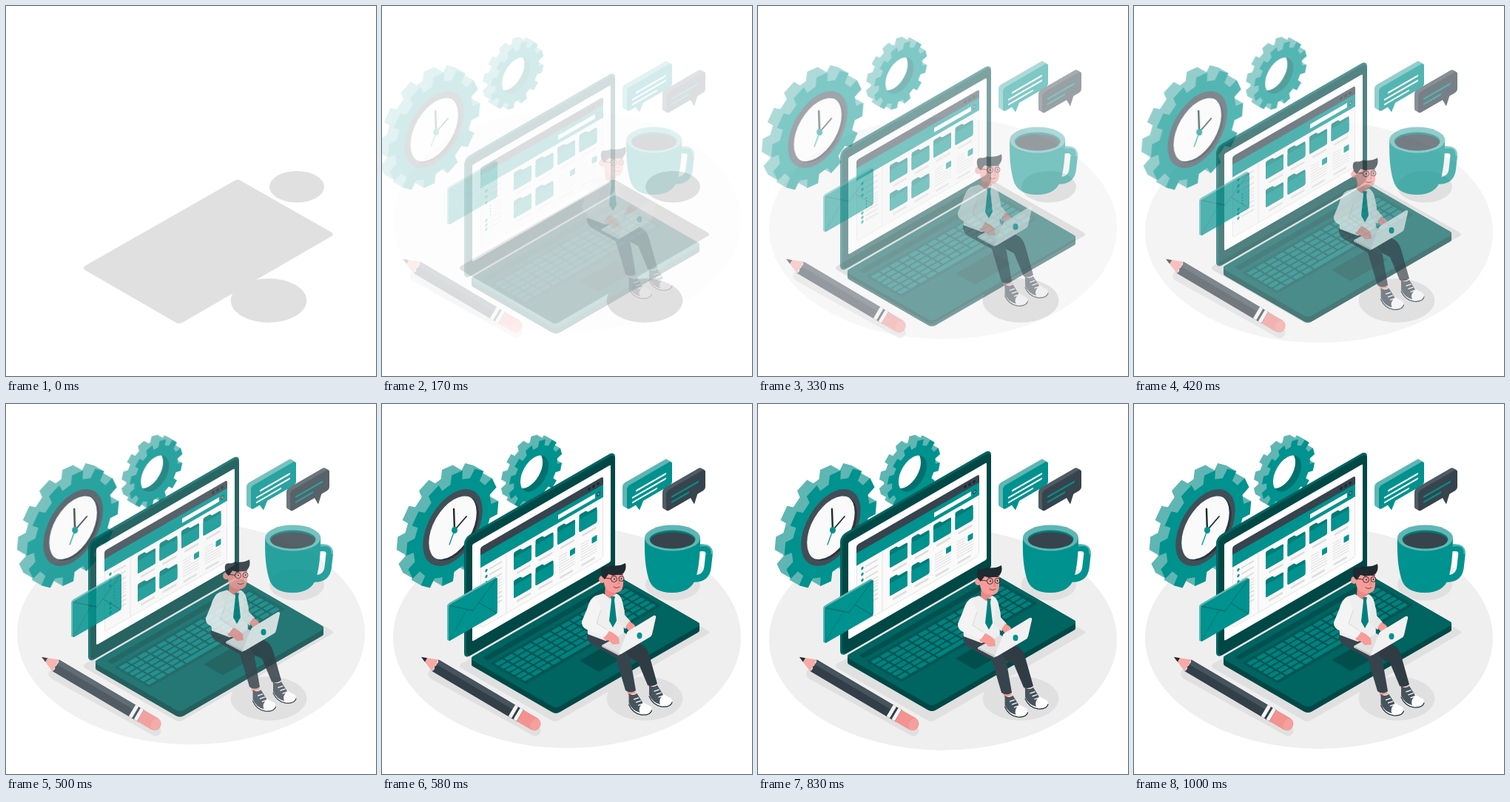
These frames come from a looping animation (500 px wide and 500 px high, 1040 ms). An HTML page:

```html
<!DOCTYPE html>
<html lang="en">
<head>
<meta charset="utf-8">
<title>Desk scene</title>
<style>
  html, body { margin: 0; width: 100%; height: 100%; overflow: hidden; background: #fff; }
  svg { display: block; width: 100vw; height: 100vh; }
</style>
</head>
<body>
<svg id="stage" viewBox="0 0 500 500"></svg>
<script>
const TEAL = '#00928e', LIGHT = '#5fb6b3', DEEP = '#006461', DARK = '#37444d', INK = '#1d2a30',
      SKIN = '#f79c98', ERASER = '#f29391', SHADE = '#e0e0e0', WHITE = '#fff';

const path = (d, fill, extra = '') => `<path d="${d}" fill="${fill}" ${extra}/>`;
const line = (d, stroke, width = 1) =>
  path(d, 'none', `stroke="${stroke}" stroke-width="${width}" stroke-linecap="round" stroke-linejoin="round"`);
const rect = (x, y, w, h, fill, r = 0) =>
  `<rect x="${x}" y="${y}" width="${w}" height="${h}" rx="${r}" fill="${fill}"/>`;
const oval = (cx, cy, rx, ry, fill) =>
  `<ellipse cx="${cx}" cy="${cy}" rx="${rx}" ry="${ry}" fill="${fill}"/>`;
const group = (transform, body) => `<g transform="${transform}">${body}</g>`;
const times = (n, draw) => Array.from({ length: n }, (_, i) => draw(i)).join('');

// Upright isometric plane: x climbs to the right, y stays vertical.
const wall = (x, y, body) => group(`matrix(1 -.577 0 1 ${x} ${y})`, body);
// Same plane with true proportions, for circles.
const disc = (x, y, body) => group(`matrix(.866 -.5 0 1 ${x} ${y})`, body);
// Horizontal isometric plane.
const ground = (x, y, body) => group(`matrix(1 -.577 1 .577 ${x} ${y})`, body);
// Thickness behind an upright shape, from back to front.
const extrude = (plane, x, y, depth, body) =>
  times(depth, i => plane(x - depth + i, y - (depth - i) * .577, body));

function cog(tip, root, teeth, phase) {
  const step = 2 * Math.PI / teeth, points = [];
  for (let i = 0; i < teeth; i++) {
    for (const [r, part] of [[root, -.29], [tip, -.23], [tip, .23], [root, .29]]) {
      const a = (i + part + phase) * step;
      points.push((r * Math.cos(a)).toFixed(1) + ' ' + (r * Math.sin(a)).toFixed(1));
    }
  }
  return `M${points.join('L')}Z`;
}

function gear(x, y, tip, root, depth, phase) {
  const d = cog(tip, root, 12, phase);
  return extrude(disc, x, y, depth, path(d, LIGHT)) + disc(x, y, path(d, TEAL));
}

// A round opening whose back is set in by the given depth.
function recess(id, x, y, r, depth, side, back) {
  return `<clipPath id="${id}"><circle r="${r}" transform="matrix(.866 -.5 0 1 ${x} ${y})"/></clipPath>` +
    disc(x, y, oval(0, 0, r, r, side)) +
    `<g clip-path="url(#${id})">${disc(x - depth, y - depth * .577, oval(0, 0, r, r, back))}</g>`;
}

function gears() {
  return gear(210.5, 94, 41.5, 34, 11, .5) +
    recess('hole', 209, 94, 22, 8, '#00716e', WHITE) +
    gear(98, 168, 72, 60.5, 13, .2) +
    disc(98.5, 167, oval(0, 0, 46.5, 46.5, '#414e57')) +
    recess('dial', 100, 168, 39, 3, '#2a363d', '#fafafa') +
    line('M101 170.5L100 142', INK, 2.4) + line('M101 170.5L117 152', INK, 1.8) +
    line('M102 168L94 190', TEAL, 1.3) + oval(101, 170.5, 4, 4.5, TEAL);
}

function folder(x, y) {
  return path(`M${x} ${y + 1}q0 -2 2 -2h7l3 3h10q2 0 2 2v17q0 2 -2 2h-20q-2 0 -2 -2z`, '#007b78') +
    path(`M${x} ${y + 6}h24v15q0 2 -2 2h-20q-2 0 -2 -2z`, TEAL) +
    rect(x + 4, y + 28, 19, 3, '#dedede', 1);
}

function note(x, y) {
  return times(7, i => rect(x, y + i * 3.6, i < 3 ? 11 : 22, 1, '#dcdcdc')) +
    rect(x + 15, y, 7, 8, TEAL, 1) + rect(x + 1, y + 28, 18, 3, '#dedede', 1);
}

function screen() {
  const menu = [46, 54, 62, 86, 92, 98];
  return rect(0, 0, 187, 131, WHITE, 2) + rect(11, 10, 166, 110, '#e6e6e6', 3) +
    rect(12, 30, 164, 89, '#fafafa') +
    path('M11 22v-9q0 -3 3 -3h160q3 0 3 3v9z', DARK) + rect(11, 21, 166, 17, TEAL) +
    times(3, i => oval(158 + i * 6, 16, 1.7, 2, '#18262c')) +
    rect(116, 27, 50, 6, WHITE) + oval(170.5, 30, 2.4, 2.8, DARK) + oval(170.5, 30, 1.2, 1.4, LIGHT) +
    rect(45.5, 38, 1, 81, '#e3e3e3') +
    menu.map(y => oval(19, y, 1.7, 2, TEAL) + rect(23, y - 1, 17, 2, '#dcdcdc')).join('') +
    times(4, i => oval(24.5, 69 + i * 4, .9, 1, TEAL) + rect(28, 68.5 + i * 4, 12, 1.2, '#dcdcdc')) +
    times(4, i => folder(56 + i * 29.5, 44)) +
    times(2, i => folder(56 + i * 29.5, 82) + note(117 + i * 29.5, 84));
}

function keyboard() {
  return times(6, row => times(14, col => {
    const inSpace = row === 5 && col > 3 && col < 9;
    if (inSpace && col > 4) return '';
    return rect(11 + col * 12.8, 23 + row * 7.2, inSpace ? 61.8 : 10.6, 5.2, '#00827f', 1);
  }));
}

function laptop() {
  return wall(111, 178, rect(0, 0, 204, 164, DEEP, 8)) +
    wall(113, 179.5, rect(1, 1, 201, 160, '#004846', 7)) +
    wall(122, 187, screen()) +
    times(9, i => ground(118, 349 - i, rect(0, 0, 197, 117, '#004846', 5))) +
    ground(118, 341, rect(0, 0, 197, 117, DEEP, 5) +
      rect(10, 8, 178, 7, '#00514f', 2) + rect(8, 20, 184, 48, '#005653', 2) +
      keyboard() + rect(72, 77, 50, 26, '#004f4d', 1));
}

function cup() {
  return line('M427 195.5Q446 191 445 203L443 221Q441 236 425 236', TEAL, 9.5) +
    line('M430 192.5Q449 187 448.5 202', LIGHT, 2) +
    path('M358 181Q357 215 363 235Q368 255 395 255Q421 255 427 235Q433 215 433 181Z', TEAL) +
    oval(395.5, 181, 37.5, 17.5, LIGHT) + oval(395.5, 183, 31, 12.5, '#007c79') +
    oval(395.5, 184.3, 30, 11, DARK);
}

function pencil() {
  return group('translate(56 342) rotate(30.6)',
    line('M26 11L183 7', SHADE, 15) +
    path('M0 0L22 -9V9Z', '#f8aaa4') + path('M0 0L7.5 -3V3Z', INK) +
    path('M22 -9H156V9H22Q25 5 22 2Q25 -3 22 -9Z', '#333f48') +
    path('M22 -9H142V-2H22Q25 -5 22 -9Z', '#46545e') +
    rect(142, -9, 5, 18, '#f5f5f5', 1) + rect(150, -9, 5, 18, '#f5f5f5', 1) +
    path('M155 -9H177Q186 -8 186 0T177 9H155Z', ERASER) +
    oval(179, 0, 6, 8.5, '#f4a09d'));
}

function bubble(x, y, w, h, depth, fill, edge, tail, ink, rows) {
  return extrude(wall, x, y, depth, rect(0, 0, w, h, edge, 4)) +
    path(tail, fill) +
    wall(x, y, rect(0, 0, w, h, fill, 4) +
      rows.map(([from, to, at]) => line(`M${from} ${at}H${to}`, ink, 2.4)).join(''));
}

function bubbles() {
  return bubble(331, 111.5, 61, 32, 6, TEAL, LIGHT, 'M341 134L348 143.5L355 126Z', WHITE,
      [[13, 52, 13], [8, 52, 19.5], [8, 40, 26]]) +
    bubble(384, 118, 53, 28, 5, DARK, '#4f5b64', 'M414 122L422 135.5L428 116Z', TEAL,
      [[8, 43, 12], [8, 30, 19]]);
}

function envelope() {
  return wall(88, 273.5, rect(0, 0, 66, 50, LIGHT, 3)) +
    wall(90, 275, rect(0, 0, 66, 49, TEAL, 3) +
      line('M1 48L25 20M65 48L41 20', '#00706d', .8) + line('M1 1L33 26L65 1', '#00706d', 1));
}

function shoe(x, y) {
  return group(`translate(${x} ${y})`,
    path('M0 2L0 15Q5 27 17 29Q29 30 31 22L30 18L14 9L10 0Z', WHITE) +
    path('M0 0L0 13Q5 24 15 26Q12 19 19 13L11 0Q5 4 0 0Z', '#46545e') +
    line('M0 15Q5 27 17 29Q29 30 31 23', INK, 1.2) +
    times(3, i => line(`M${7 + i * 3} ${8 + i * 4}l6 -2`, WHITE, 1.3)));
}

function man() {
  return path('M358 380L370 378L371 388L362 389Z', SKIN) + path('M330 388L342 386L343 398L334 400Z', SKIN) +
    shoe(361, 383) + shoe(333.5, 394) +
    path('M318 320L349 327Q358 331 361 342L372 381Q366 386 359 383L346 352L325 341Z', '#303c44') +
    path('M277 314Q276 323 284 328L316 346L329 390Q336 395 343 390L336 350Q334 339 322 332L297 317Z', DARK) +
    path('M302 244H316V264L309 269L301 262Z', '#ec8886') +
    path('M299 259L308 266L317 259Q325 263 326 277L327 316L302 323L278 314Q275 275 289 262Z', '#efefef') +
    path('M322 268Q328 276 328 288L336 297L329 307L319 298Z', '#e9e9e9') +
    path('M329 304L334 297Q342 300 343 306L334 310Z', SKIN) +
    path('M309 263H315L314 268L317 296L312 305L307 296L310 268Z', '#00807d') +
    path('M297 329L328 312L334 318L320 342Z', SHADE) +
    path('M297 329L320 340V343L297 331Z', '#c9c9c9') +
    path('M320 340L331 312Q332 310 334 309L367 289Q371 288 370 292L365 314Q364 317 362 318L323 341Q319 343 320 340Z', '#f1f1f1') +
    oval(348, 316, 3.5, 4.2, TEAL) +
    path('M299 315L305 309Q314 312 320 319L321 327L312 328L307 323L300 321Z', SKIN) +
    path('M289 262Q281 265 277 280L270 297Q269 304 277 308L301 318L307 310L290 299L297 281Z', '#f4f4f4') +
    line('M296 281L290 299L304 308', '#d0d0d0', .8) +
    path('M300 229Q298 246 303 253Q307 258 318 258Q326 256 326 245V229Z', SKIN) +
    oval(297.5, 240, 4.3, 5, SKIN) +
    path('M301 240L297 236Q293 222 302 223Q307 223 309 221Q320 223 329 218Q331 226 326 232Q316 236 306 233Z', INK) +
    line('M311 234.5L316 233.5M321 233.5L325 233.5', INK, 1) +
    `<g fill="none" stroke="${INK}" stroke-width=".9"><circle cx="313.5" cy="239.5" r="4"/>` +
    `<circle cx="323.5" cy="239" r="3.5"/></g>` + line('M300 238L309 239', INK, .9) +
    oval(314, 239.5, .9, 1.1, INK) + oval(323.5, 239, .9, 1.1, INK) +
    line('M319 241L321 246L318 246', '#d96f6e', .8) + line('M313 250Q317 253 321 250', INK, .7);
}

function shadows() {
  return path('M309 236Q313 233 317 236L440 306Q444 309 440 311L238 428Q234 430 230 428L107 357Q103 354 107 351Z', SHADE) +
    oval(393, 244.3, 37, 21.3, SHADE) + oval(355, 398, 51.3, 29.7, SHADE);
}

// Each layer fades in while sliding along its direction; null stands still.
const layers = [
  [oval(250, 318, 235, 150, '#efefef'), [0, -1]],
  [shadows(), null],
  [gears(), [-1, 0]],
  [cup(), [-1, 0]],
  [pencil(), [-1, 0]],
  [laptop(), [0, 1]],
  [bubbles(), [0, 0]],
  [envelope(), [0, -1]],
  [man(), [0, -1]]
];
const stage = document.getElementById('stage');
stage.innerHTML = layers.map(([body]) => `<g>${body}</g>`).join('');
const nodes = [...stage.children];

const LOOP = 1040, FRAME = 1000 / 24, START = 80, FADE = 500, END = START + FADE, HALF = 250;

function render(ms) {
  const tick = Math.min(24, Math.floor((ms % LOOP + 5) / FRAME));
  const t = tick * FRAME;
  const shown = Math.max(0, Math.min(1, (t - START) / FADE));
  const drift = t < END ? 1 : Math.abs(1 - (t - END) / HALF);
  const slide = 30 * (1 - shown) + 3 * drift;
  layers.forEach(([, dir], i) => {
    if (!dir) return;
    nodes[i].setAttribute('opacity', shown);
    nodes[i].setAttribute('transform', `translate(${dir[0] * slide} ${dir[1] * slide})`);
  });
}

function loop() {
  render(performance.now());
  requestAnimationFrame(loop);
}
loop();
</script>
</body>
</html>
```
